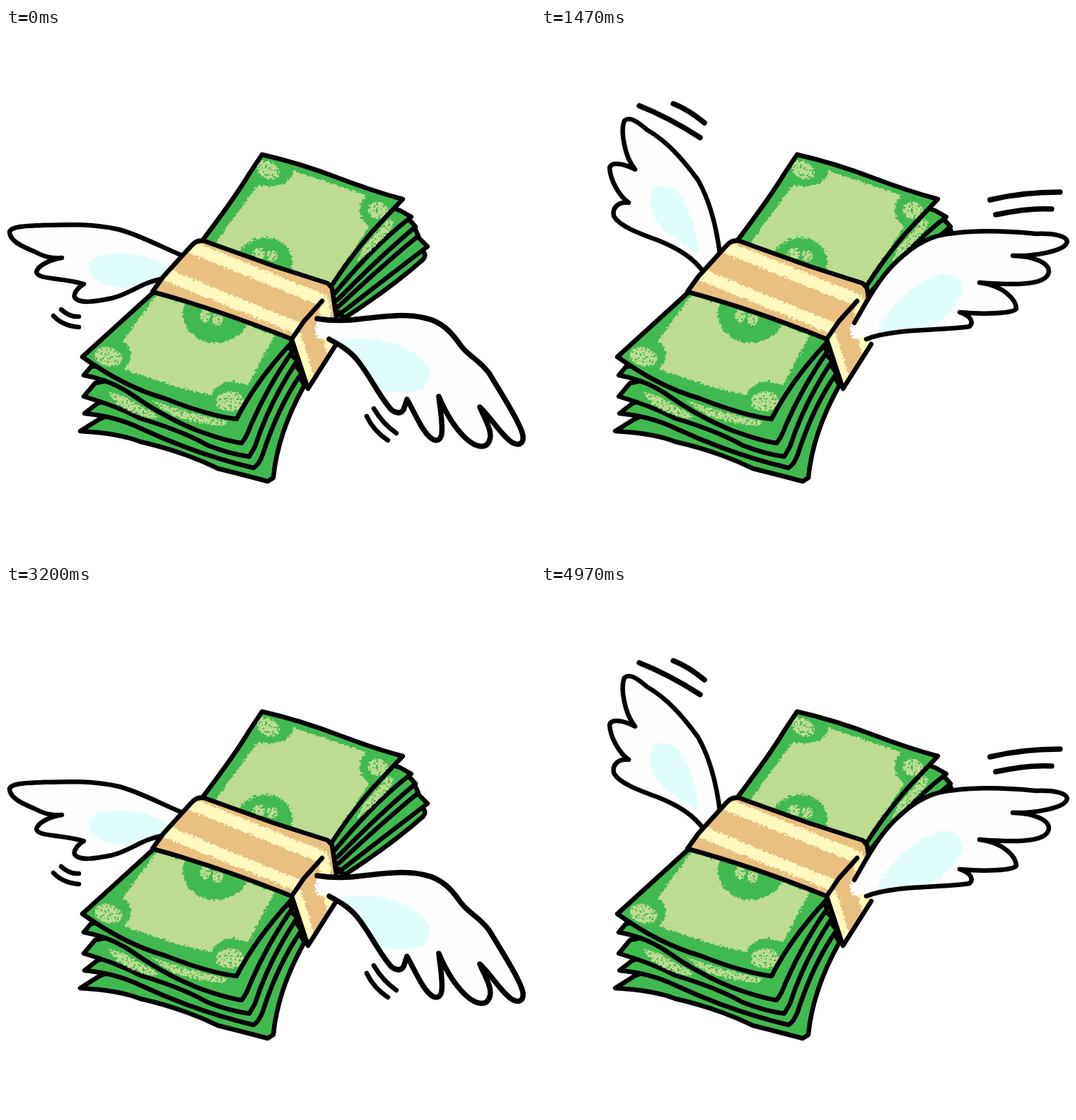
Write an HTML page that moves like this. It is 748x748 px and loops after 5.11 s.

```html
<!DOCTYPE html>
<html lang="en">
<head>
<meta charset="utf-8">
<title>Flying money</title>
<style>
  html, body { margin: 0; width: 100%; height: 100%; overflow: hidden; background: #fff; }
  svg { display: block; width: 100%; height: 100%; }
  .ink { fill: none; stroke: #000; stroke-width: 6.5; stroke-linecap: round; stroke-linejoin: round; }
  .bold { stroke-width: 7.5; }
  .sheet, .dark { fill: #40ba4e; }
  .light { fill: #bddc90; }
  .wing { fill: #fefefe; }
  .shade { fill: #e1fefc; }
  .tan { fill: #e8c080; }
  .cream { fill: none; stroke: #fff9bd; }
</style>
</head>
<body>
<svg viewBox="0 0 748 748">
  <defs>
    <filter id="chalk" x="-10%" y="-10%" width="120%" height="120%" color-interpolation-filters="sRGB">
      <feTurbulence type="fractalNoise" baseFrequency=".28" numOctaves="2" seed="4"/>
      <feDisplacementMap in="SourceGraphic" scale="9" xChannelSelector="R" yChannelSelector="G"/>
    </filter>
    <filter id="speckle" x="-10%" y="-10%" width="120%" height="120%" color-interpolation-filters="sRGB">
      <feTurbulence type="fractalNoise" baseFrequency=".3" numOctaves="2" seed="9" result="noise"/>
      <feColorMatrix in="noise" values="0 0 0 0 0  0 0 0 0 0  0 0 0 0 0  12 0 0 0 -4.3" result="holes"/>
      <feDisplacementMap in="SourceGraphic" in2="noise" scale="7" xChannelSelector="R" yChannelSelector="G"/>
      <feComposite in2="holes" operator="in"/>
    </filter>
    <path id="note" d="M362 179Q415 191 470 212Q520 231 561 242L527 278Q495 312 462 362L402 447Q353 500 326 553Q286 548 225 524Q168 508 108 465L207 375 278 300Q325 238 344 206Z"/>
    <path id="frontShape" d="M207 373L222 352 262 308Q270 299 280 301L458 362 447 386 421 415 404 440Q300 398 207 373Z"/>
    <clipPath id="onNote"><use href="#note"/></clipPath>
    <clipPath id="front"><use href="#frontShape"/></clipPath>
    <clipPath id="side"><path d="M404 440L421 415 447 386 460 365 468 411 467 447 427 510Z"/></clipPath>
    <path id="leftDown" d="M250 322C220 310 190 293 160 285C120 276 80 278 50 279C30 280 8 280 5 288C5 300 20 308 40 316C55 324 65 326 79 325C65 327 45 335 43 345C45 356 75 352 110 362C100 368 94 378 98 382C105 390 125 387 150 382C175 376 195 358 224 354"/>
    <path id="leftUp" d="M253 320C248 280 239 245 222 215C200 185 178 160 150 144C135 131 125 125 118 131C112 145 118 182 133 200C118 192 99 188 97 198C98 215 110 237 124 247C110 245 100 254 103 266C110 280 140 291 165 300C195 312 215 325 230 345"/>
    <path id="rightDown" d="M457 440C470 447 485 455 497 470C515 492 527 520 545 540Q556 548 562 540L567 525C580 548 590 574 604 582Q614 586 616 574C618 560 614 540 612 521C622 545 635 566 650 580C665 594 680 596 684 582C688 570 678 555 670 536C685 550 700 575 714 585C725 592 732 588 731 577C729 562 705 524 683 488C668 468 655 465 643 449C630 430 616 415 592 410C565 404 540 407 505 411Q470 416 440 411"/>
    <path id="rightUp" d="M443 417C455 397 475 357 500 333C530 303 555 292 585 290C625 285 670 288 700 291C725 290 743 294 744 302C742 316 695 323 667 322C700 323 719 333 718 345C715 366 660 363 620 360C655 364 672 385 672 397C667 404 625 405 592 402C608 407 612 416 606 422C575 428 500 424 460 440"/>
  </defs>

  <!-- Sheets behind the band, upper end -->
  <g class="ink">
    <path class="sheet" d="M555 270L589 315Q595 321 590 327Q545 367 480 409L440 395Z"/>
    <path class="sheet" d="M555 268L596 309Q550 344 474 403L440 390Z"/>
    <path class="sheet" d="M555 265L579 285 583 294Q535 333 470 394L440 385Z"/>
    <path class="sheet" d="M550 262L572 273 579 281Q530 322 468 385L440 380Z"/>
    <path class="sheet" d="M545 254L557 258 573 267Q520 308 465 375L440 370Z"/>
  </g>
  <path class="light" filter="url(#speckle)" d="M540 270L549 275Q545 291 496 332L505 311Z"/>

  <!-- Sheets behind the band, lower end -->
  <g class="ink">
    <path class="sheet" d="M132 553L105 570Q160 573 190 585Q248 598 300 623Q340 633 370 641L378 636Q384 573 422 505L390 450Z"/>
    <path class="sheet" d="M129 531L111 545Q155 549 190 566Q270 603 350 622Q358 617 363 603Q385 535 418 488L390 450Z"/>
    <path class="sheet" d="M126 502L110 521Q155 534 190 552Q250 570 285 590Q315 602 344 606L352 592Q372 530 412 470L390 450Z"/>
  </g>
  <path class="light" filter="url(#speckle)" d="M145 514Q165 519 184 531L219 551Q198 554 178 543Q152 532 145 514Z"/>
  <path class="ink sheet" d="M120 479L110 491Q150 498 182 521Q225 551 270 569Q308 583 333 587Q340 579 346 562Q370 507 405 457L390 440Z"/>
  <path class="light" filter="url(#speckle)" d="M205 526Q260 546 314 556L308 562Q250 559 222 539Z"/>

  <!-- Top note -->
  <use href="#note" class="sheet"/>
  <g clip-path="url(#onNote)">
    <g filter="url(#chalk)">
      <path class="light" d="M378 192L533 245Q515 282 455 368L284 320Z"/>
      <path class="light" d="M214 376L174 430 162 448 169 483 235 506 330 528 348 494 380 434Z"/>
      <g class="dark">
        <ellipse cx="368" cy="203" rx="37" ry="21" transform="rotate(4 368 203)"/>
        <circle cx="525" cy="257" r="25"/>
        <ellipse cx="143" cy="462" rx="33" ry="27"/>
        <ellipse cx="321" cy="524" rx="31" ry="24"/>
        <ellipse cx="366" cy="331" rx="39" ry="35"/>
        <ellipse cx="297" cy="405" rx="47" ry="40"/>
      </g>
    </g>
    <g class="light" filter="url(#speckle)">
      <ellipse cx="371" cy="201" rx="17" ry="12" transform="rotate(28 371 201)"/>
      <ellipse cx="526" cy="258" rx="14" ry="12"/>
      <ellipse cx="145" cy="465" rx="20" ry="13" transform="rotate(14 145 465)"/>
      <ellipse cx="317" cy="528" rx="20" ry="14"/>
      <ellipse cx="358" cy="319" rx="9" ry="8"/>
      <ellipse cx="377" cy="322" rx="8" ry="8"/>
      <ellipse cx="282" cy="407" rx="8" ry="9"/>
      <ellipse cx="299" cy="412" rx="8" ry="9"/>
    </g>
  </g>
  <use href="#note" class="ink"/>

  <!-- Left wing -->
  <g class="down">
    <use href="#leftDown" class="wing"/>
    <path class="shade" filter="url(#chalk)" d="M117 335C125 316 160 317 190 322C215 328 237 338 230 347C200 355 185 365 165 368C140 366 115 355 117 335Z"/>
    <use href="#leftDown" class="ink"/>
    <path class="ink" d="M78 398Q90 409 103 408M67 407Q80 421 103 423"/>
  </g>
  <g class="up">
    <use href="#leftUp" class="wing"/>
    <path class="shade" filter="url(#chalk)" d="M155 236C160 216 190 220 203 246C215 270 222 295 222 319C200 305 175 290 165 275Q151 256 155 236Z"/>
    <use href="#leftUp" class="ink"/>
    <path class="ink bold" d="M139 110Q180 126 225 155M187 107Q208 115 231 134"/>
  </g>

  <!-- Paper band -->
  <path class="tan" d="M207 373L222 352 262 308Q270 299 280 301L460 365 468 411 467 447 427 510 404 440Q300 398 207 373Z"/>
  <g clip-path="url(#front)">
    <path class="cream" stroke-width="17" filter="url(#chalk)" d="M250 305L465 392M220 346L430 432"/>
  </g>
  <g clip-path="url(#side)">
    <path class="cream" stroke-width="16" filter="url(#chalk)" d="M447 377L462 465M408 430L432 508"/>
  </g>
  <path class="ink" d="M467 447L427 510 404 440Q300 398 207 373L222 352 262 308Q270 299 280 301L380 337 455 361 461 368 467 408M404 440L421 415 447 386"/>
  <ellipse cx="447" cy="427" rx="10" ry="13" fill="#fefefe" filter="url(#chalk)"/>

  <!-- Right wing -->
  <g class="down">
    <use href="#rightDown" class="wing"/>
    <path class="shade" filter="url(#chalk)" d="M473 442C510 434 560 445 585 465C605 482 602 503 585 512C565 518 540 516 524 511C512 485 495 462 473 445Z"/>
    <use href="#rightDown" class="ink bold"/>
    <path class="ink" d="M520 538Q533 560 552 573M510 549Q520 570 540 583"/>
  </g>
  <g class="up">
    <use href="#rightUp" class="wing"/>
    <path class="shade" filter="url(#chalk)" d="M474 431C485 400 525 361 560 350C590 342 602 361 592 382C583 402 565 418 540 424Q505 425 474 431Z"/>
    <use href="#rightUp" class="ink"/>
    <path class="ink bold" d="M635 243Q680 232 734 232M643 264Q690 254 722 256"/>
  </g>
</svg>
<script>
  const LOOP = 5110;
  // Five poses fill each 800 ms beat.
  const BEAT = 800, STARTS = [0, 170, 330, 500, 670];
  const show = (name, on) => document.querySelectorAll('.' + name)
    .forEach(part => part.style.display = on ? '' : 'none');
  let shown = null;

  function render(ms) {
    const t = ms % LOOP;
    const step = STARTS.filter(start => start <= t % BEAT).length - 1;
    const flap = Math.floor(t / BEAT) * STARTS.length + step;
    const up = flap % 2 === 1;
    if (up === shown) return;
    shown = up;
    show('up', up);
    show('down', !up);
  }

  const origin = performance.now();
  function tick() {
    render(performance.now() - origin);
    requestAnimationFrame(tick);
  }
  tick();
</script>
</body>
</html>
```
